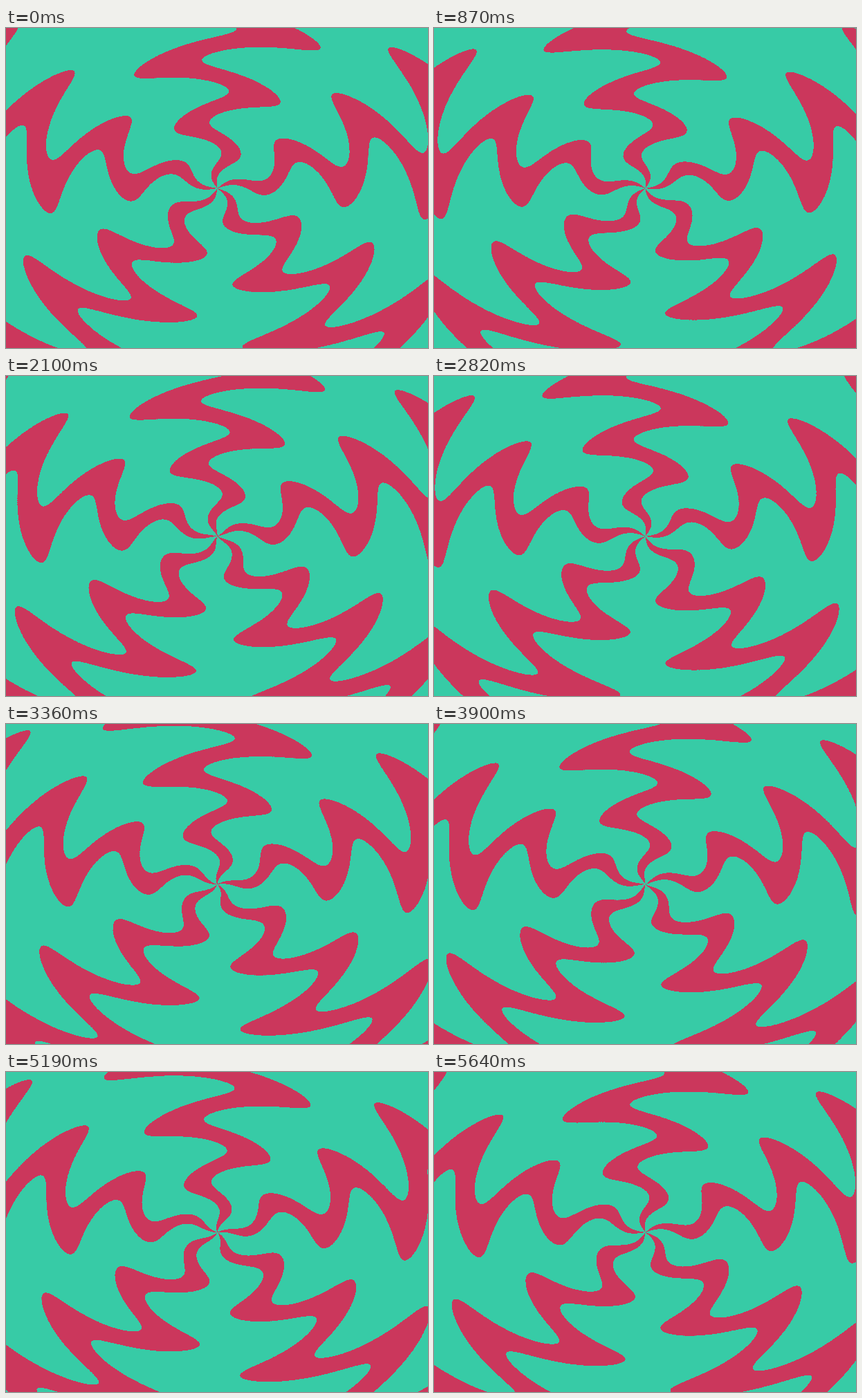
Recreate the animation shown at these times as an HTML page with a canvas. Size 610x463 px, loop 5.67 s.

```html
<!DOCTYPE html>
<html lang="en">
<head>
<meta charset="utf-8">
<title>Wavy star</title>
<style>
  html, body { margin: 0; width: 100%; height: 100%; overflow: hidden; background: #37cba6; }
  canvas { display: block; }
</style>
</head>
<body>
<canvas id="stage" width="610" height="463"></canvas>
<script>
  const W = 610, H = 463, COUNT = W * H;
  const STEP_MS = 30, STEPS = 189;
  const ARMS = 5, SECTOR = 2 * Math.PI / ARMS, HALF_WIDTH = SECTOR / 6;
  const SWING = 0.3, WAVES = 16, START = 5, SPEED = 0.1;
  const RINGS = 2048, MAX_RADIUS = 1.5;

  const ctx = document.getElementById('stage').getContext('2d');
  const image = ctx.createImageData(W, H);
  const pixels = new Uint32Array(image.data.buffer);

  const packed = (r, g, b) => new Uint32Array(new Uint8Array([r, g, b, 255]).buffer)[0];
  const RED = packed(203, 55, 92);
  const GREEN = packed(55, 203, 166);

  // Polar coordinates in a space stretched to a square; angle 0 points up.
  const turn = new Float32Array(COUNT);
  const ring = new Uint16Array(COUNT);
  for (let y = 0, i = 0; y < H; y++) {
    for (let x = 0; x < W; x++, i++) {
      const u = 2 * x / W - 1, v = 2 * y / H - 1;
      turn[i] = Math.atan2(u, -v) / SECTOR + ARMS;
      ring[i] = Math.round(Math.hypot(u, v) / MAX_RADIUS * RINGS);
    }
  }

  const offset = new Float32Array(RINGS + 1);
  const edge = HALF_WIDTH / SECTOR;

  function draw(step) {
    const phase = START + SPEED * step;
    for (let k = 0; k <= RINGS; k++) {
      const radius = k / RINGS * MAX_RADIUS;
      offset[k] = SWING * Math.sin(WAVES * radius - phase) / SECTOR + 0.5;
    }
    for (let i = 0; i < COUNT; i++) {
      const a = turn[i] + offset[ring[i]];
      pixels[i] = Math.abs(a - Math.floor(a) - 0.5) < edge ? RED : GREEN;
    }
    ctx.putImageData(image, 0, 0);
  }

  let shown = -1;
  function tick() {
    const step = Math.floor(performance.now() / STEP_MS) % STEPS;
    if (step !== shown) draw(shown = step);
    requestAnimationFrame(tick);
  }
  tick();
</script>
</body>
</html>
```
